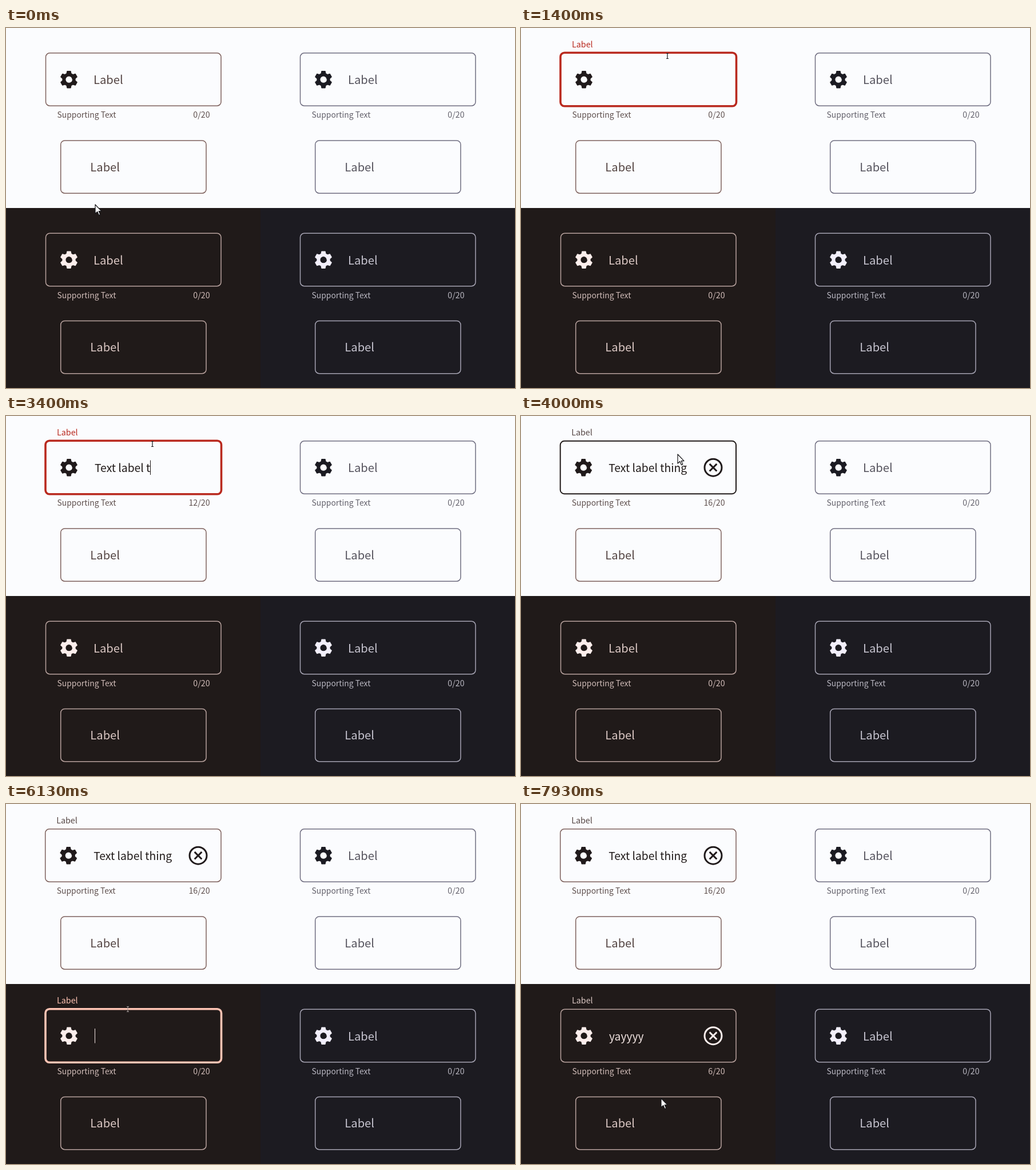
Animation, 890 px wide and 630 px high, one loop 8 s. Source, as an HTML page with a canvas:

```html
<!DOCTYPE html>
<html lang="en">
<head>
<meta charset="utf-8">
<title>Outlined text fields</title>
<style>
html, body { margin: 0; width: 100%; height: 100%; overflow: hidden; }
canvas { display: block; }
</style>
</head>
<body>
<canvas id="stage" width="890" height="630"></canvas>
<script>
const ctx = document.getElementById('stage').getContext('2d');
const LOOP = 8000;
const FAMILY = '"Noto Sans CJK JP", "Noto Sans CJK SC", "Noto Sans CJK", sans-serif';

const panels = [
  { x: 0, y: 0, bg: '#fbfcfe', line: '#7d605c', label: '#544543', note: '#5f504e', icon: '#201a1b',
    ink: '#201a19', focusColor: '#b9291e',
    field: { text: 'Text label thing', focus: [730, 930], blur: 3870, shift: -0.8, caretOn: 1070, caretOff: [1400, 1730],
      keys: [1930, 2070, 2330, 2400, 2600, 2800, 2930, 3070, 3130, 3270, 3400, 3400, 3530, 3600, 3600, 3730],
      hover: [[470, 730], [3870, 4530]] } },
  { x: 445, y: 0, bg: '#fbfcfe', line: '#6f6d80', label: '#55535d', note: '#63616b', icon: '#1b1b22' },
  { x: 0, y: 315.5, bg: '#201a19', line: '#b8a29e', label: '#dbc8c4', note: '#d0bcb8', icon: '#fceeec',
    ink: '#efe2df', focusColor: '#ffc4b4',
    field: { text: 'yayyyy', focus: [5070, 5200], blur: 7200, shift: 0, caretOn: 5530, caretOff: [5800, 6130],
      keys: [6270, 6400, 6470, 6670, 6870, 7000], hover: [[7200, 7600]] } },
  { x: 445, y: 315.5, bg: '#1c1b21', line: '#a5a3b2', label: '#c7c5d0', note: '#b9b7c1', icon: '#f2effb' }
];

// time, x, y, shape
const cursorPath = [
  [0, 156, 309, 'arrow'],
  [400, 238, 42, 'hand'],
  [530, 226, 75, 'hand'],
  [800, 226, 75, 'beam'],
  [1000, 256, 49, 'beam'],
  [3800, 256, 49, 'beam'],
  [3870, 266, 142, 'arrow'],
  [4000, 274, 67, 'arrow'],
  [4400, 274, 67, 'arrow'],
  [4670, 823, 300, 'arrow'],
  [4870, 560, 540, 'arrow'],
  [5070, 213, 360, 'hand'],
  [5530, 213, 360, 'hand'],
  [5600, 213, 359, 'beam'],
  [7470, 213, 359, 'arrow'],
  [7930, 245, 515, 'arrow'],
  [8000, 245, 515, 'arrow']
];

const mix = (a, b, p) => a + (b - a) * p;
const progress = (t, [start, end]) => Math.max(0, Math.min(1, (t - start) / (end - start)));
const within = (t, [start, end]) => t >= start && t < end;

function write(text, x, y, size, color, align = 'left') {
  ctx.font = `${size}px ${FAMILY}`;
  ctx.textAlign = align;
  ctx.fillStyle = color;
  ctx.fillText(text, x, y);
}

function box(left, top, right, bottom, color, width) {
  ctx.beginPath();
  ctx.roundRect(left, top, right - left, bottom - top, 7);
  ctx.strokeStyle = color;
  ctx.lineWidth = width;
  ctx.stroke();
}

function gear(x, y, color) {
  ctx.save();
  ctx.translate(x, y);
  ctx.beginPath();
  for (let i = 0; i < 6; i++) {
    for (const [px, py] of [[-4, -10.4], [-3, -14.7], [3, -14.7], [4, -10.4]]) ctx.lineTo(px, py);
    ctx.rotate(Math.PI / 3);
  }
  ctx.closePath();
  ctx.moveTo(6.2, 0);
  ctx.arc(0, 0, 6.2, 0, 7, true);
  ctx.fillStyle = ctx.strokeStyle = color;
  ctx.lineWidth = 1.2;
  ctx.lineJoin = 'round';
  ctx.fill('evenodd');
  ctx.stroke();
  ctx.restore();
}

function clearButton(x, y, color) {
  ctx.strokeStyle = color;
  ctx.lineWidth = 3;
  ctx.beginPath();
  ctx.arc(x, y, 15, 0, 7);
  ctx.moveTo(x - 6.3, y - 6.3);
  ctx.lineTo(x + 6.3, y + 6.3);
  ctx.moveTo(x + 6.3, y - 6.3);
  ctx.lineTo(x - 6.3, y + 6.3);
  ctx.stroke();
}

function drawField(panel, t) {
  const f = panel.field;
  const raised = f ? 1 - (1 - progress(t, f.focus)) ** 2 : 0;
  const blurred = f && t >= f.blur;
  const focused = raised > 0 && !blurred;
  const hovered = f && f.hover.some(span => within(t, span));
  const typed = f ? f.text.slice(0, f.keys.filter(k => t >= k).length) : '';
  const dx = blurred ? f.shift : 0;

  if (focused) {
    const grow = raised * 0.5;
    box(69.5 - grow, 43.8 - grow, 376 + grow, 136.2 + grow, panel.focusColor, mix(1.5, 3.6, raised));
  } else {
    box(69.5 + dx, 43.8, 376, 136.2, hovered ? panel.ink : panel.line, hovered ? 2 : 1.5);
  }

  gear(110 + dx, 90.2, panel.icon);
  write('Label', mix(153, 89, raised) + dx, mix(98, 33.5, raised), mix(20.2, 14.3, raised),
    focused ? panel.focusColor : panel.label);
  write('Supporting Text', 89.5 + dx, 157.3, 13.9, panel.note);
  write(typed.length + '/20', 356.5, 157.3, 14.2, panel.note, 'right');

  if (!f) return;
  const textX = 155 + dx - (blurred ? 1 : 0);
  write(typed, textX, 98, 19.3, panel.ink);
  if (focused && t >= f.caretOn && !within(t, f.caretOff)) {
    ctx.fillRect(Math.round(textX + ctx.measureText(typed).width), 77.5, 1, 25.5);
  }
  if (blurred) clearButton(336, 90.2, panel.icon);
}

function drawPanel(panel, t) {
  ctx.save();
  ctx.translate(panel.x, panel.y);
  drawField(panel, t);
  box(95.7, 197, 350, 289.2, panel.line, 1.5);
  write('Label', 147.3, 250.8, 20.2, panel.label);
  ctx.restore();
}

const shapes = {
  arrow: new Path2D('M0 0V16L3.8 12.5L6.4 18.6L8.8 17.6L6.2 11.6H11Z'),
  hand: new Path2D('M-1 1Q0 -.6 1 1V5L4 5.5Q5.5 6 5.3 8L4.3 12.5H-1L-3.6 8.5Q-3.6 6.6 -1 8Z'),
  beam: new Path2D('M-2 -4.5H2M0 -4.5V4.5M-2 4.5H2')
};

function drawCursor(t) {
  const i = cursorPath.findLastIndex(k => k[0] <= t);
  const from = cursorPath[i], to = cursorPath[i + 1];
  const p = progress(t, [from[0], to[0]]);
  const x = mix(from[1], to[1], p), y = mix(from[2], to[2], p);
  const shape = shapes[from[3]];
  ctx.save();
  ctx.translate(x, y);
  ctx.lineWidth = 1.2;
  ctx.lineJoin = 'round';
  ctx.strokeStyle = from[3] === 'beam' && y > 315 ? '#a39a98' : '#17171a';
  if (from[3] !== 'beam') {
    ctx.fillStyle = '#fff';
    ctx.fill(shape);
  }
  ctx.stroke(shape);
  ctx.restore();
}

function frame(now) {
  // Fifteen pictures a second, on times rounded to 10 ms.
  const step = Math.floor(((now % LOOP) + 5) * 0.015) % 120;
  const t = Math.round(step * 20 / 3) * 10;
  for (const p of panels) {
    ctx.fillStyle = p.bg;
    ctx.fillRect(p.x, Math.floor(p.y), 445, 315);
  }
  for (const p of panels) drawPanel(p, t);
  drawCursor(t);
  requestAnimationFrame(frame);
}
requestAnimationFrame(frame);
</script>
</body>
</html>
```
